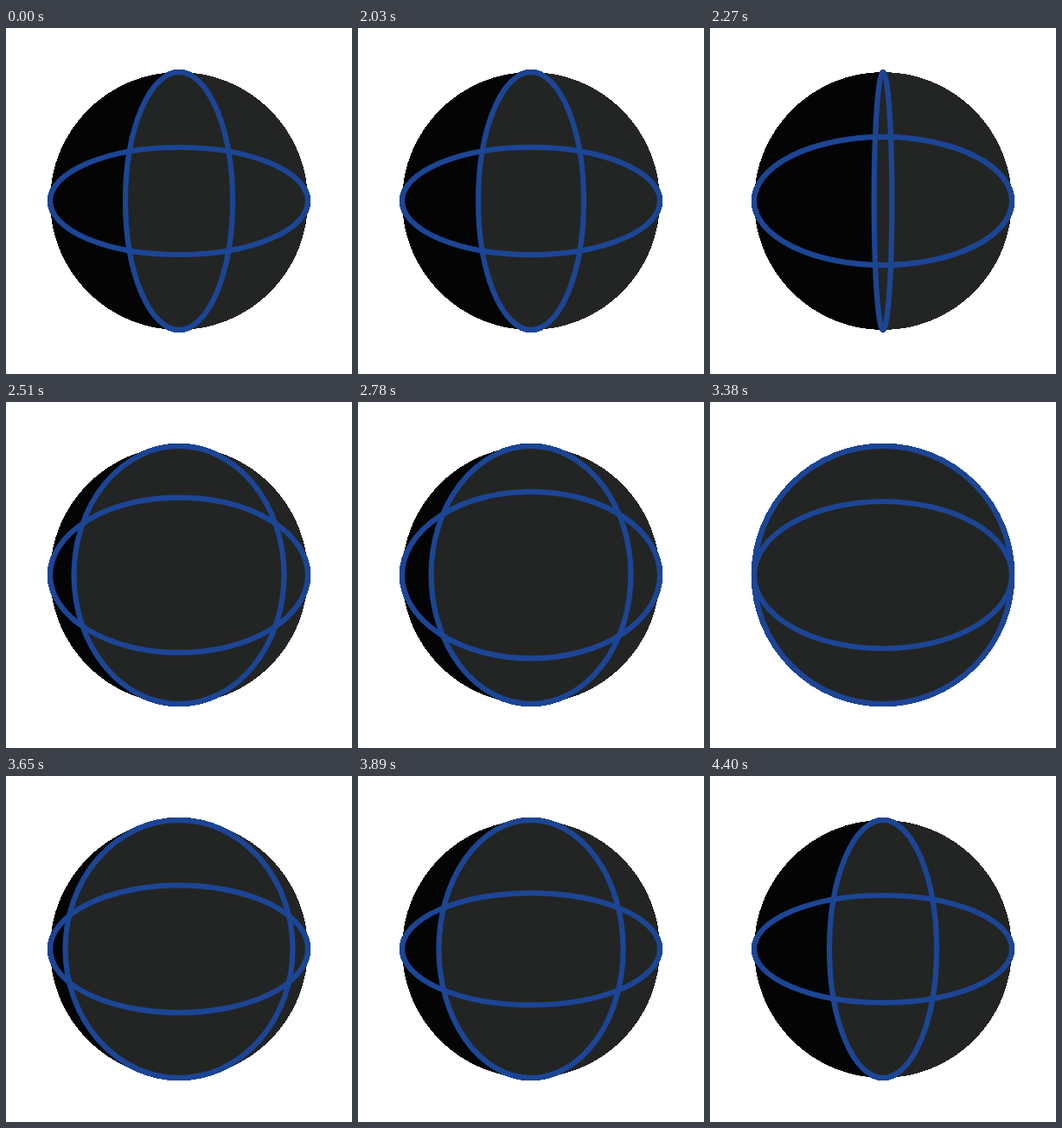
An HTML page for the animation above (4.43 s loop, 400 by 400 pixels).

```html
<!DOCTYPE html>
<html lang="en">
<head>
<meta charset="utf-8">
<title>Turning ball</title>
<style>
  html, body { margin: 0; width: 100%; height: 100%; overflow: hidden; background: #fff; }
  svg { display: block; width: 100%; height: 100%; }
  ellipse { fill: none; stroke: #1c4595; stroke-width: 6.2; }
  .shade { fill: #040404; }
  .lit { fill: #232524; }
  .hard { shape-rendering: crispEdges; }
  .hard ellipse { stroke-width: 6.8; }
</style>
</head>
<body>
<svg viewBox="0 0 400 400">
  <!-- The silhouette has a hard edge; the rings inside it are smooth -->
  <g class="hard">
    <ellipse class="meridian" cx="200" cy="200" rx="62" ry="149"/>
    <ellipse class="equator" cx="200" cy="200" rx="149" ry="62"/>
    <circle class="shade" cx="200" cy="200" r="149"/>
    <path class="lit" d="M200 51a149 149 0 0 1 0 298z"/>
  </g>
  <ellipse class="meridian lit" cx="200" cy="200" rx="62" ry="149"/>
  <ellipse class="equator" cx="200" cy="200" rx="149" ry="62"/>
</svg>
<script>
  const LOOP = 4430, REST = 2000, MOVE = 2400, STEP = 30, R = 149;
  const START = Math.asin(62 / R);

  // [progress, value]
  const turn = [[0, 0], [.2125, .22], [.4125, .594], [.575, .818], [.7875, .9415], [1, 1]];
  const tilt = [[0, 62], [.2125, 89.7], [.32, 96.3], [.4125, 94], [.575, 85], [.7875, 64.7], [1, 62]];

  const meridians = document.querySelectorAll('.meridian');
  const equators = document.querySelectorAll('.equator');

  function slope(pts, i) {
    if (i === 0 || i === pts.length - 1) return 0;
    const [a, b] = [pts[i - 1], pts[i + 1]];
    return (b[1] - a[1]) / (b[0] - a[0]);
  }

  // Smooth curve through the points, at rest at both ends
  function curve(pts, u) {
    let i = 0;
    while (i < pts.length - 2 && u > pts[i + 1][0]) i++;
    const [x0, y0] = pts[i], [x1, y1] = pts[i + 1];
    const w = x1 - x0, h = (u - x0) / w, k = 1 - h;
    return y0 * k * k * (1 + 2 * h) + y1 * h * h * (3 - 2 * h)
      + w * h * k * (slope(pts, i) * k - slope(pts, i + 1) * h);
  }

  function setAll(items, name, value) {
    for (const item of items) item.setAttribute(name, value.toFixed(2));
  }

  function draw(now) {
    const t = Math.max(0, now % LOOP - REST);
    const u = Math.min(1, Math.floor(t / STEP) * STEP / MOVE);
    const angle = START - 2 * Math.PI * curve(turn, u);
    setAll(meridians, 'rx', Math.abs(R * Math.sin(angle)));
    setAll(equators, 'ry', curve(tilt, u));
  }

  let begin;
  function tick(now) {
    begin ??= now;
    draw(now - begin);
    requestAnimationFrame(tick);
  }
  requestAnimationFrame(tick);
</script>
</body>
</html>
```
